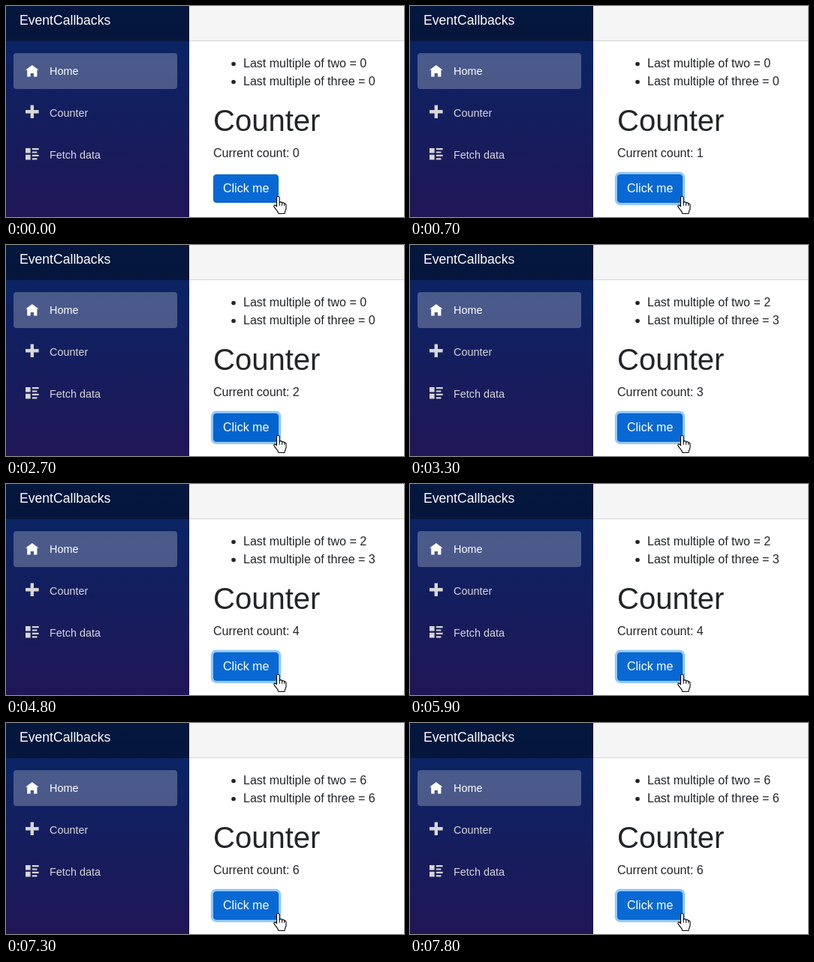
These frames come from a looping animation (530 by 282 pixels, 8 s). An HTML page:

```html
<!DOCTYPE html>
<html lang="en">
<head>
<meta charset="utf-8">
<title>Counter</title>
<style>
  html, body { margin: 0; width: 100%; height: 100%; overflow: hidden; background: #fff; }
  svg { display: block; width: 530px; height: 282px; }
  text { font: 16px "Liberation Sans", Arial, sans-serif; fill: #212529; white-space: pre; }
  .brand { font-size: 17.6px; fill: #fff; }
  .nav text { font-size: 14.4px; fill: #d7d7d7; }
  .nav path { fill: #d7d7d7; }
  .nav .active { fill: #fff; }
  h1, .title { font-size: 40px; }
</style>
</head>
<body>
<svg viewBox="0 0 530 282">
  <defs>
    <linearGradient id="side" gradientUnits="userSpaceOnUse" x1="0" y1="-9" x2="0" y2="560">
      <stop offset="0" stop-color="#052767"/>
      <stop offset="1" stop-color="#3a0647"/>
    </linearGradient>
  </defs>

  <rect width="530" height="282" fill="#fff"/>
  <rect x="244" width="286" height="46" fill="#f5f5f5"/>
  <rect x="244" y="46" width="286" height="1" fill="#d6d5d5"/>

  <rect width="244" height="282" fill="url(#side)"/>
  <rect width="244" height="47" fill="#000" fill-opacity=".4"/>
  <text class="brand" x="18" y="25">EventCallbacks</text>

  <g class="nav">
    <rect x="10" y="63" width="218" height="48" rx="4" fill="#fff" fill-opacity=".25"/>
    <path class="active" transform="translate(26 79) scale(2.2)" d="M4 0l-4 3h1v4h2v-2h2v2h2v-4.03l1 .03z"/>
    <path transform="translate(26 132.5) scale(2.2)" d="M3 0v3h-3v2h3v3h2v-3h3v-2h-3v-3z"/>
    <path transform="translate(26 190) scale(2.2)" d="M0 0v3h3v-3zM4 0v1h4v-1zM4 2v1h3v-1zM0 4v3h3v-3zM4 4v1h4v-1zM4 6v1h3v-1z"/>
    <text class="active" x="58" y="92">Home</text>
    <text x="58" y="148">Counter</text>
    <text x="58" y="204">Fetch data</text>
  </g>

  <circle cx="303" cy="77.5" r="2.8" fill="#212529"/>
  <circle cx="303" cy="101.5" r="2.8" fill="#212529"/>
  <text x="316" y="82">Last multiple of two = <tspan id="two">0</tspan></text>
  <text x="316" y="106">Last multiple of three = <tspan id="three">0</tspan></text>
  <text class="title" x="276" y="167">Counter</text>
  <text x="276" y="202">Current count: <tspan id="count">0</tspan></text>

  <rect id="ring" x="276" y="225" width="87" height="38" rx="4" fill="none" stroke="#92c7ff"/>
  <rect id="button" x="276.5" y="225.5" width="86" height="37" rx="3.5"/>
  <text x="289" y="249" style="fill:#fff">Click me</text>

  <path transform="translate(356 254)" fill="#fff" stroke="#000" stroke-width="1.1" stroke-linejoin="round"
    d="M4.5 14V2.3C4.500 -.1 8.200 -.1 8.200 2.300V9C8.500 7.400 11.500 7.500 11.600 9.500C12.300 8.300 14.600 8.700 14.700 10.400C15.500 9.600 17 10.200 17 12V16.500C17 18.500 15 20.500 15 23.500H6.800C6.500 20.500 3.500 18.500 1.200 14.600C-.2 12.200 2.500 10.800 4.500 14Z"/>
  <path transform="translate(356 254)" stroke="#000" d="M8.200 9V13M11.600 9.500V13M14.700 10.400V13"/>
</svg>

<script>
  const LOOP = 8000, HOLD = 200, FADE = 150;
  const presses = [100, 1500, 2600, 4300, 5900, 6800];
  const el = id => document.getElementById(id);
  const [two, three, count, ring, button] = ["two", "three", "count", "ring", "button"].map(el);

  const ease = (t, from) => {
    const k = Math.min(1, Math.max(0, (t - from) / FADE));
    return k * k * (3 - 2 * k);
  };
  const mix = (a, b, k) => `rgb(${a.map((v, i) => Math.round(v + (b[i] - v) * k))})`;
  const show = (node, value) => {
    if (node.textContent !== String(value)) node.textContent = value;
  };

  function draw(t) {
    const n = presses.filter(p => t >= p + HOLD).length;
    show(count, n);
    // The list refreshes only on every third click.
    show(two, n < 3 ? 0 : n < 6 ? 2 : 6);
    show(three, n - n % 3);

    const focus = ease(t, presses[0]);
    ring.setAttribute("stroke-width", 6.4 * focus);
    ring.setAttribute("stroke-opacity", focus);

    const down = presses.reduce((sum, p) => sum + ease(t, p) - ease(t, p + HOLD), 0);
    button.setAttribute("fill", mix([8, 105, 212], [0, 98, 204], down));
    button.setAttribute("stroke", mix([2, 98, 204], [0, 92, 191], down));
  }

  let start;
  function tick(now) {
    start ??= now;
    draw((now - start) % LOOP);
    requestAnimationFrame(tick);
  }
  draw(0);
  requestAnimationFrame(tick);
</script>
</body>
</html>
```
